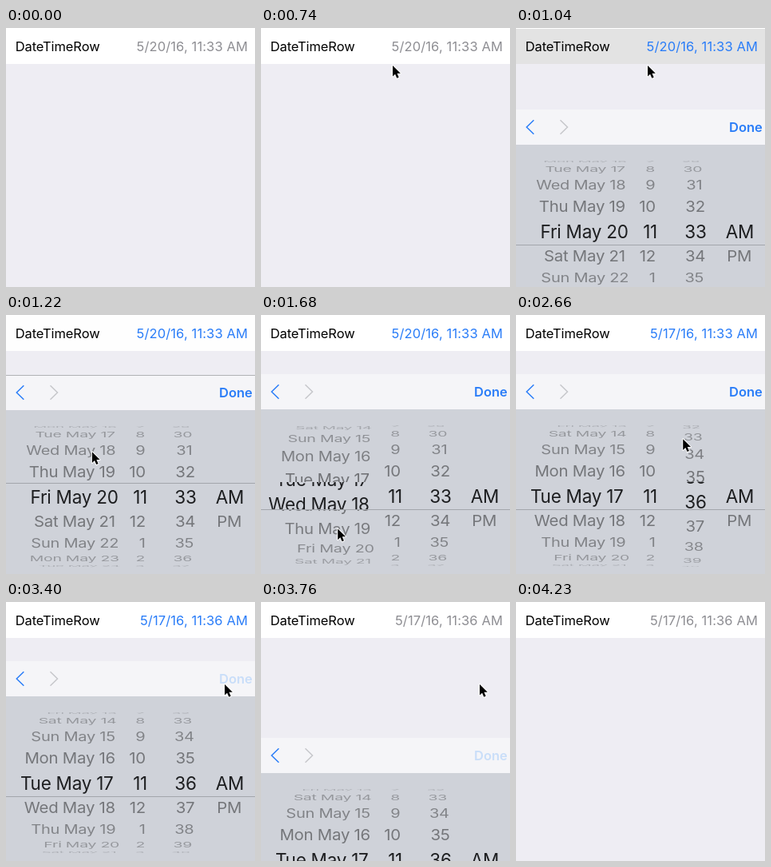
An HTML page with a canvas for the animation above (4.97 s loop, 312x324 px).

```html
<!DOCTYPE html>
<html lang="en">
<head>
<meta charset="utf-8">
<title>DateTimeRow</title>
<style>
  html, body { margin: 0; width: 100%; height: 100%; overflow: hidden; background: #eeedf3; }
  canvas { display: block; }
</style>
</head>
<body>
<canvas id="stage" width="312" height="324"></canvas>
<script>
const ctx = document.getElementById('stage').getContext('2d');
const LOOP = 4970, BEAT = 60, W = 312, H = 324;
const BLUE = '#2a7df8', GREY = '#8e8e93';
const WEEKDAYS = ['Sat', 'Sun', 'Mon', 'Tue', 'Wed', 'Thu', 'Fri'];
const ARROW = new Path2D('M0 0V13.6L3.1 10.8L5.3 15.8L7.7 14.8L5.5 9.8H9.8Z');

const ENTER = { x: 304, y: 80 };
const MOVES = [
  { from: 290, to: 740, x: 165, y: 47 },    // tap the row
  { from: 1040, to: 1340, x: 97, y: 195 },  // reach the dates
  { from: 1470, to: 1790, x: 96, y: 288 },  // drag them down
  { from: 1970, to: 2330, x: 212, y: 240 }, // reach the minutes
  { from: 2380, to: 2770, x: 209, y: 148 }, // drag them up
  { from: 2770, to: 3200, x: 274, y: 103 }, // press Done
  { from: 4000, to: 4230, x: 312, y: 172 }  // leave
];
const [, , DATE_DRAG, , MINUTE_DRAG] = MOVES;

function progress(t, { from, to }) {
  const p = Math.min(1, Math.max(0, (t - from) / (to - from)));
  return 1 - (1 - p) ** 2;
}

function rect(color, x, y, w, h) {
  ctx.fillStyle = color;
  ctx.fillRect(x, y, w, h);
}

function text(str, x, midY, color, size, align = 'left', spacing = 0, weight = 400) {
  ctx.font = `${weight} ${size}px Inter, sans-serif`;
  ctx.letterSpacing = spacing + 'px';
  ctx.textAlign = align;
  ctx.fillStyle = color;
  ctx.fillText(str, x, midY + size * 0.364);
}

function chevron(x, y, dir, color) {
  ctx.beginPath();
  ctx.moveTo(x + 4.5 * dir, y - 8.8);
  ctx.lineTo(x - 4.5 * dir, y);
  ctx.lineTo(x + 4.5 * dir, y + 8.8);
  ctx.strokeStyle = color;
  ctx.lineWidth = 1.5;
  ctx.stroke();
}

// Each column returns the pieces of one row: text, x, alignment.
const COLUMNS = {
  date: (n, big) => {
    const dayX = big ? 113.2 : 116.3;
    return [[WEEKDAYS[n % 7] + ' May ', dayX, 'right'], [String(n), dayX, 'left']];
  },
  hour: (n, big) => [[String((n - 1) % 12 + 1), big ? 177 : 175, 'right']],
  minute: n => [[String(n), 225, 'center']],
  half: n => [[['AM', 'PM'][n] || '', 280.5, 'center']]
};

function wheel(column, pos, midY, big) {
  const radius = 87.7, pitch = 20.7 * Math.PI / 180, reach = big ? 2 : 4.3;
  for (let n = Math.ceil(pos - reach); n <= pos + reach; n++) {
    const angle = (n - pos) * pitch, depth = Math.cos(angle);
    const color = big ? '#1d1e20' : `rgba(0,0,0,${0.12 + 0.34 * depth})`;
    ctx.save();
    ctx.translate(W / 2, midY + radius * Math.sin(angle));
    if (!big) ctx.scale(0.9 + 0.1 * depth, Math.max(depth, 0.05));
    ctx.translate(-W / 2, 0);
    for (const [str, x, align] of column(n, big)) {
      text(str, x, 0, color, big ? 22.5 : 20.5, align, -0.25);
    }
    ctx.restore();
  }
}

function wheels(t, midY, big) {
  wheel(COLUMNS.date, 20 - 3 * progress(t, DATE_DRAG), midY, big);
  wheel(COLUMNS.hour, 11, midY, big);
  wheel(COLUMNS.minute, 33 + 3 * progress(t, MINUTE_DRAG), midY, big);
  wheel(COLUMNS.half, 0, midY, big);
}

function clipped(bands, paint) {
  ctx.save();
  ctx.beginPath();
  bands.forEach(([top, bottom]) => ctx.rect(0, top, W, bottom - top));
  ctx.clip();
  paint();
  ctx.restore();
}

function panel(t, y, pressed) {
  const bandTop = y + 135, bandEnd = y + 169, midY = y + 152.5;
  rect('#f5f5f8', 0, y, W, 44);
  rect('#cfd2d9', 0, y + 44, W, H);
  chevron(17.8, y + 22, 1, BLUE);
  chevron(60, y + 22, -1, '#c6c7cb');
  text('Done', 267, y + 22.3, pressed ? '#c9def9' : BLUE, 16.5, 'left', 0, 600);
  clipped([[y + 64, bandTop], [bandEnd, y + 242]], () => wheels(t, midY, false));
  clipped([[bandTop, bandEnd]], () => wheels(t, midY, true));
  // Half-pixel hairlines: only those landing on a whole pixel are visible.
  if (y % 2) {
    rect('#b0b1b5', 0, y, W, 1);
    rect('#a3a6ac', 0, bandTop, W, 1);
  } else {
    rect('#a3a6ac', 0, bandEnd, W, 1);
  }
}

function cursor(t) {
  let { x, y } = ENTER;
  for (const move of MOVES) {
    const p = progress(t, move);
    x += (move.x - x) * p;
    y += (move.y - y) * p;
  }
  ctx.save();
  ctx.translate(x, y);
  ctx.lineJoin = 'round';
  ctx.lineWidth = 2;
  ctx.strokeStyle = '#fff';
  ctx.stroke(ARROW);
  ctx.fillStyle = '#000';
  ctx.fill(ARROW);
  ctx.restore();
}

function draw(time) {
  // Movement advances in beats; switches happen at their exact time.
  const t = Math.floor((time - 20) / BEAT) * BEAT + 20;
  const settle = Math.exp((1040 - t) / 55);
  const editing = time >= 1040 && time < 3760;

  rect('#eeedf3', 0, 0, W, H);
  rect('#fff', 0, 0, W, 45);
  if (time >= 800) {
    const shade = editing ? Math.round(255 - 28 * settle) : time < 1040 ? 217 : 255;
    rect(`rgb(${shade},${shade},${shade})`, 0, 1, W, 44);
  }

  const day = time < 2030 ? 20 : 17, minute = time < 2830 ? 33 : 36;
  text('DateTimeRow', 11.7, 23, '#000', 16.5, 'left', -0.1);
  text(`5/${day}/16, 11:${minute} AM`, 303, 23, editing ? BLUE : GREY, 16.5, 'right', 0.12);

  if (time >= 1040 && time < 3820) {
    panel(t, editing ? Math.round(74 + 28 * settle) : 170, time >= 3350);
  }
  if (time >= 290 && time < 4230) cursor(t);
}

const start = performance.now();
function tick() {
  draw((performance.now() - start) % LOOP);
  requestAnimationFrame(tick);
}
tick();
</script>
</body>
</html>
```
